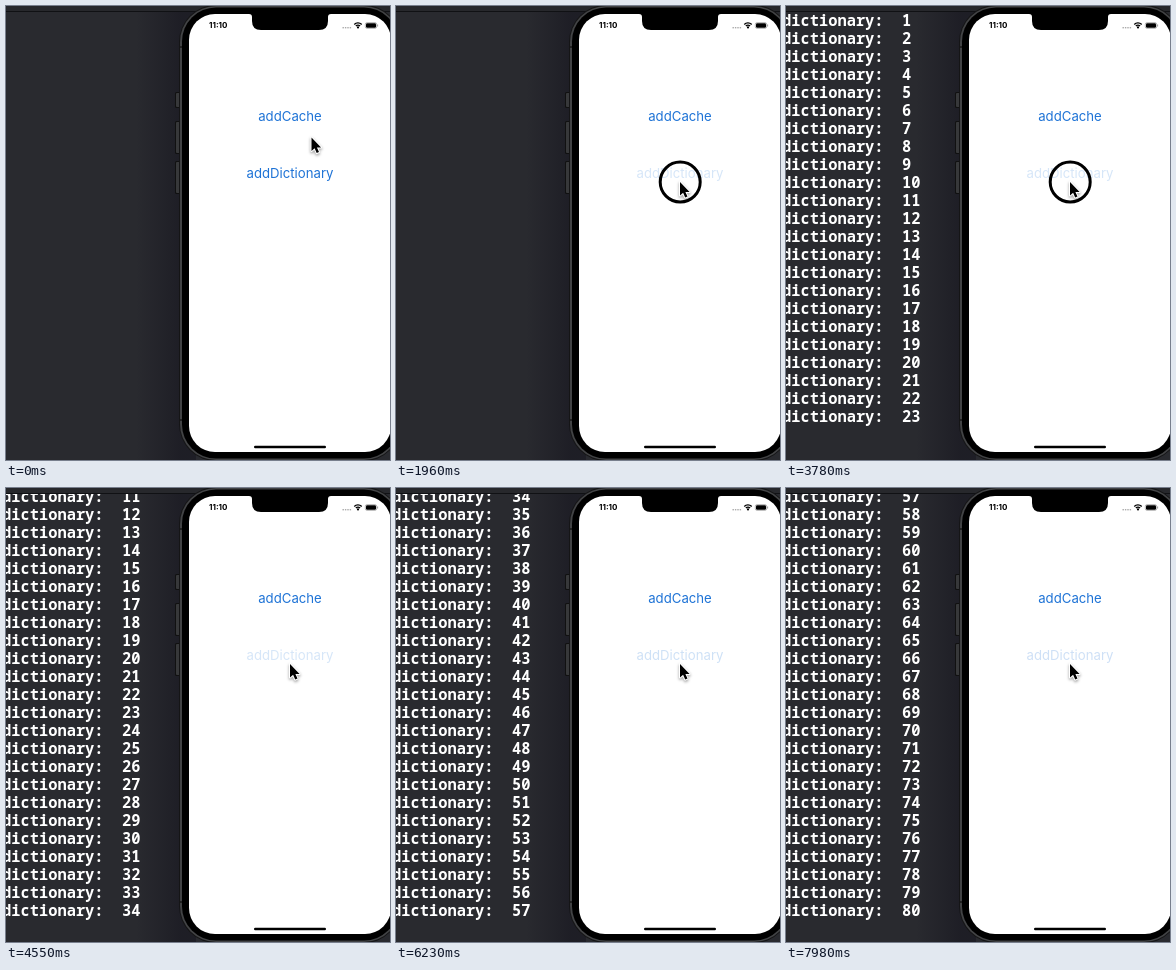
An HTML page with a canvas that plays this animation: 384x454 px, repeating every 8000 ms.

```html
<!DOCTYPE html>
<html lang="en">
<head>
<meta charset="utf-8">
<style>
html, body { margin: 0; width: 100%; height: 100%; overflow: hidden; background: #292a2f; }
canvas { display: block; width: 384px; height: 454px; }
</style>
</head>
<body>
<canvas id="stage"></canvas>
<script>
const W = 384, H = 454, LOOP = 8000, TICK = 70;
const canvas = document.getElementById('stage');
const ctx = canvas.getContext('2d');
const dpr = window.devicePixelRatio || 1;
canvas.width = W * dpr;
canvas.height = H * dpr;

const UI = 'Inter, Roboto, sans-serif';
const MONO = '"Noto Sans Mono", "DejaVu Sans Mono", monospace';
const ROW = 18, FIRST_LINE = 20, LAST_LINE = 428, MAX_ROWS = 23;

// Ticks at which the log stalls, and ticks at which it catches up by two
const STALLS = [31, 36, 40, 60, 64, 77, 81, 92, 105, 107];
const DOUBLES = [61, 65, 82, 108];
// Spans in ms during which the touch ring shows
const TOUCHES = [[1820, 2030], [2520, 2800], [3570, 4060], [4340, 4550], [4760, 5040],
  [5530, 5880], [6510, 6930], [7420, 7700]];
// Time followed by values
const POINTER = [[0, 305.5, 131.5], [140, 300, 142], [280, 281, 172], [400, 268.5, 192],
  [560, 278, 197], [700, 279, 196], [1120, 284, 180], [1260, 284, 180], [1330, 284, 177.5],
  [1470, 284, 177.5], [1610, 284, 176]];
const FADE = [[1750, 1], [1820, 0.6], [1890, 0.35], [1960, 0.18], [2800, 0.18], [3010, 0.4],
  [3290, 0.18], [6020, 0.18], [6090, 0.25], [6300, 0.2], [6580, 0.18], [7840, 0.18], [7980, 0.22]];

function sample(keys, t) {
  const i = keys.findIndex(k => k[0] > t);
  if (i === 0) return keys[0].slice(1);
  if (i < 0) return keys[keys.length - 1].slice(1);
  const a = keys[i - 1], b = keys[i], p = (t - a[0]) / (b[0] - a[0]);
  return a.slice(1).map((v, n) => v + (b[n + 1] - v) * p);
}

function countAt(tick) {
  const passed = list => list.filter(n => n <= tick).length;
  return Math.max(0, tick - 28 - passed(STALLS) + passed(DOUBLES));
}

function rect(x, y, w, h, fill) {
  ctx.fillStyle = fill;
  ctx.fillRect(x, y, w, h);
}

function round(x, y, w, h, r, fill) {
  ctx.beginPath();
  ctx.roundRect(x, y, w, h, r);
  ctx.fillStyle = fill;
  ctx.fill();
}

function text(str, x, y, font, fill, align = 'left') {
  ctx.font = font;
  ctx.textAlign = align;
  ctx.fillStyle = fill;
  ctx.fillText(str, x, y);
}

function drawConsole(count) {
  rect(0, 0, W, H, '#292a2f');
  const shade = ctx.createLinearGradient(130, 0, 175, 0);
  shade.addColorStop(0, 'rgba(28,28,36,0)');
  shade.addColorStop(1, 'rgba(28,28,36,0.85)');
  rect(130, 0, 60, H, shade);

  ctx.save();
  ctx.beginPath();
  ctx.rect(0, 6, W, H);
  ctx.clip();
  const scrolled = count > MAX_ROWS;
  const first = Math.max(1, count - MAX_ROWS);
  for (let n = first; n <= count; n++) {
    const y = scrolled ? LAST_LINE - (count - n) * ROW : FIRST_LINE + (n - 1) * ROW;
    text('dictionary:  ' + n, -4, y, `bold 15.4px ${MONO}`, '#fff');
  }
  ctx.restore();
  rect(0, 0, W, 5, '#27282c');
  rect(0, 5, W, 1, '#101114');
}

function drawStatus() {
  text('11:10', 203, 22.3, `700 8px ${UI}`, '#000');
  for (let i = 0; i < 4; i++) rect(336.5 + i * 2.4, 21, 1.4, 1.4, '#aaa');

  ctx.strokeStyle = '#000';
  ctx.lineWidth = 1.4;
  for (const r of [2.9, 5.1]) {
    ctx.beginPath();
    ctx.arc(352, 22, r, -Math.PI * 0.76, -Math.PI * 0.24);
    ctx.stroke();
  }
  ctx.beginPath();
  ctx.arc(352, 21.4, 1.1, 0, 7);
  ctx.fillStyle = '#000';
  ctx.fill();

  ctx.beginPath();
  ctx.roundRect(359.3, 16.6, 11.4, 5.8, 1.8);
  ctx.lineWidth = 0.6;
  ctx.strokeStyle = '#888';
  ctx.stroke();
  round(360, 17.2, 10, 4.6, 1.2, '#000');
  rect(371.3, 18.5, 0.8, 2, '#888');
}

function drawNotch() {
  ctx.beginPath();
  ctx.moveTo(243, 7);
  ctx.lineTo(243, 8);
  ctx.quadraticCurveTo(246, 8, 246, 11);
  ctx.lineTo(246, 15);
  ctx.quadraticCurveTo(246, 24, 255, 24);
  ctx.lineTo(313, 24);
  ctx.quadraticCurveTo(322, 24, 322, 15);
  ctx.lineTo(322, 11);
  ctx.quadraticCurveTo(322, 8, 325, 8);
  ctx.lineTo(325, 7);
  ctx.fillStyle = '#000';
  ctx.fill();
}

function drawPhone(fade) {
  for (const [y, h] of [[86, 16], [115, 33], [155, 33]]) {
    round(169, y, 7, h, 1.5, '#111');
    round(170, y + 1, 5, h - 2, 1, '#37383a');
  }
  round(173, -1, 222, 456, 37, '#151516');
  round(174, 0, 220, 454, 36, '#424345');
  round(176, 1.5, 216, 451, 34, '#000');
  rect(174, 40, 2, 2, '#222');
  rect(174, 413, 2, 2, '#222');
  round(183, 8, 202, 438, 26, '#fff');
  drawNotch();
  drawStatus();
  round(248, 439.8, 72, 2.4, 1.2, '#000');

  const font = `400 13.2px ${UI}`, blue = '#1e73d6';
  text('addCache', 284, 115.2, font, blue, 'center');
  ctx.globalAlpha = fade;
  text('addDictionary', 284, 172.2, font, blue, 'center');
  ctx.globalAlpha = 1;
}

function drawRing() {
  ctx.beginPath();
  ctx.arc(284.2, 176, 20, 0, Math.PI * 2);
  ctx.lineWidth = 3;
  ctx.strokeStyle = '#000';
  ctx.stroke();
}

function drawPointer(x, y) {
  const shape = new Path2D('M0 0V13.6L3.1 10.8L5.2 15.6L7.5 14.6L5.4 9.9H9.6Z');
  ctx.save();
  ctx.translate(x, y);
  ctx.shadowColor = 'rgba(0,0,0,0.4)';
  ctx.shadowBlur = 3 * dpr;
  ctx.shadowOffsetY = 1.5 * dpr;
  ctx.lineWidth = 2;
  ctx.lineJoin = 'round';
  ctx.strokeStyle = '#fff';
  ctx.stroke(shape);
  ctx.shadowColor = 'transparent';
  ctx.fillStyle = '#000';
  ctx.fill(shape);
  ctx.restore();
}

function draw(time) {
  const tick = Math.floor((time % LOOP) / TICK);
  const t = tick * TICK;
  ctx.setTransform(dpr, 0, 0, dpr, 0, 0);
  drawConsole(countAt(tick));
  drawPhone(sample(FADE, t)[0]);
  if (TOUCHES.some(([on, off]) => t >= on && t < off)) drawRing();
  drawPointer(...sample(POINTER, t));
}

const start = performance.now();
function loop() {
  draw(performance.now() - start);
  requestAnimationFrame(loop);
}
loop();
</script>
</body>
</html>
```
